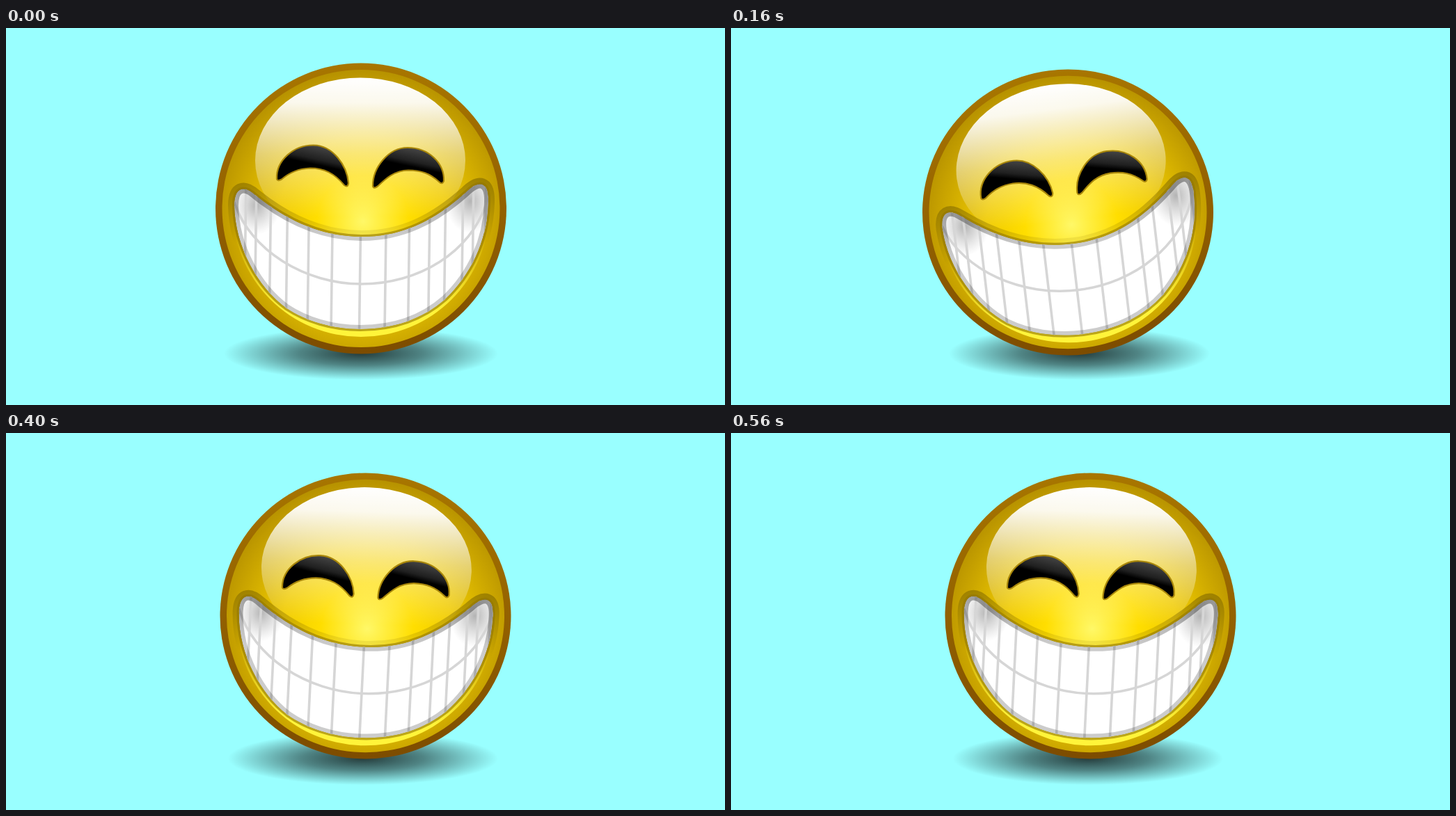
Write an HTML page that moves like this. It is 1033 px wide and 542 px high and loops after 0.64 s.

```html
<!DOCTYPE html>
<html lang="en">
<head>
<meta charset="utf-8">
<title>Rocking grin</title>
<style>
html, body { margin: 0; width: 100%; height: 100%; overflow: hidden; background: #9ff; }
svg { display: block; width: 100%; height: 100%; }
</style>
</head>
<body>
<svg viewBox="0 0 1033 542">
  <defs>
    <radialGradient id="shade">
      <stop offset="0" stop-color="#000" stop-opacity=".76"/>
      <stop offset=".45" stop-color="#000" stop-opacity=".48"/>
      <stop offset="1" stop-color="#000" stop-opacity="0"/>
    </radialGradient>
    <linearGradient id="rim" x2="0" y2="1">
      <stop offset="0" stop-color="#a87600"/>
      <stop offset="1" stop-color="#7d4c00"/>
    </linearGradient>
    <radialGradient id="skin" gradientUnits="userSpaceOnUse" cx="513" cy="278" r="222">
      <stop offset="0" stop-color="#fff868"/>
      <stop offset=".3" stop-color="#ffde00"/>
      <stop offset=".55" stop-color="#f0cb00"/>
      <stop offset="1" stop-color="#b48f00"/>
    </radialGradient>
    <linearGradient id="chin" gradientUnits="userSpaceOnUse" x1="0" y1="300" x2="0" y2="410">
      <stop offset="0" stop-color="#fff43a" stop-opacity="0"/>
      <stop offset="1" stop-color="#fff43a"/>
    </linearGradient>
    <linearGradient id="gloss" gradientUnits="userSpaceOnUse" x1="0" y1="71" x2="0" y2="272">
      <stop offset="0" stop-color="#fff"/>
      <stop offset=".18" stop-color="#fff" stop-opacity=".93"/>
      <stop offset=".55" stop-color="#fff" stop-opacity=".45"/>
      <stop offset="1" stop-color="#fff" stop-opacity="0"/>
    </linearGradient>
    <linearGradient id="eye" x1=".65" y1="0" x2=".42" y2=".6">
      <stop offset="0" stop-color="#484848"/>
      <stop offset=".55" stop-color="#202020"/>
      <stop offset=".75" stop-color="#000"/>
    </linearGradient>
    <linearGradient id="lip" gradientUnits="userSpaceOnUse" x1="0" y1="220" x2="0" y2="310">
      <stop offset="0" stop-color="#806800" stop-opacity=".6"/>
      <stop offset="1" stop-color="#806800" stop-opacity="0"/>
    </linearGradient>
    <linearGradient id="gum" gradientUnits="userSpaceOnUse" x1="0" y1="225" x2="0" y2="300">
      <stop offset="0" stop-opacity=".36"/>
      <stop offset="1" stop-opacity=".2"/>
    </linearGradient>
    <radialGradient id="corner">
      <stop offset="0" stop-color="#777" stop-opacity=".55"/>
      <stop offset="1" stop-color="#999" stop-opacity="0"/>
    </radialGradient>
    <path id="mouth" d="M328 255C328 230 341 225 358 240C405 278 455 300 512 300C570 300 616 276 660 237C680 217 694 221 693 250C692 305 668 355 631 390C598 419 556 433 509 433C468 433 430 421 403 403C362 373 329 315 328 255Z"/>
    <clipPath id="inside"><use href="#mouth"/></clipPath>
  </defs>

  <ellipse id="shadow" cy="468" ry="38" fill="url(#shade)"/>
  <g id="ball">
    <circle cx="510" cy="259.5" r="209" fill="url(#rim)"/>
    <circle cx="510" cy="259.5" r="199.500" fill="url(#skin)"/>
    <ellipse cx="509" cy="190.5" rx="151" ry="119" fill="url(#gloss)"/>
    <g id="face">
      <circle cx="510" cy="259.5" r="184.500" fill="url(#chin)"/>
      <g fill="url(#eye)" stroke="#a8860a" stroke-width="2.2" stroke-linejoin="round">
        <path d="M389 217C388 190 414 168 442 168.500C470 169 490 198 492 223Q491 230 486 226C472 209 457 201.500 437 201.500C420 202 407 208 396 217.500Q390 221 389 217Z"/>
        <path d="M527 227C527 201 549 172 577 172C607 172 630 194 629 220Q627 226 622 221C609 209 596 204.500 578 204.500C558 205 546 216 534 227.500Q528 232 527 227Z"/>
      </g>
      <use href="#mouth" fill="none" stroke="url(#lip)" stroke-width="18"/>
      <use href="#mouth" fill="none" stroke="#917600" stroke-opacity=".6" stroke-width="6"/>
      <g clip-path="url(#inside)">
        <use href="#mouth" fill="#fff"/>
        <ellipse cx="360" cy="255" rx="34" ry="42" fill="url(#corner)"/>
        <ellipse cx="667" cy="249" rx="36" ry="46" fill="url(#corner)"/>
        <g fill="none" stroke="#d6d6d6" stroke-width="3.6">
          <path id="teeth"/>
          <path d="M328 250C350 320 430 368 511 368C590 368 670 325 693 243"/>
        </g>
        <use href="#mouth" fill="none" stroke="url(#gum)" stroke-width="12"/>
      </g>
    </g>
  </g>
</svg>
<script>
const el = id => document.getElementById(id);
const STEP = 80;

// Sideways roll, tilt in degrees, top and bottom of the ball, drop of the face
const poses = [
  [0, 0, 51, 468, 0],
  [-13, -3.9, 55, 468, 5],
  [-26, -7.4, 60, 470, 6],
  [-13, -3.9, 55, 468, 5],
  [0, 0, 51, 468, 5],
  [6.5, 2, 58, 468, 5],
  [14.5, 4, 68.5, 469.5, 1],
  [6.5, 2, 58, 468, 5]
];

const gaps = [345, 360, 381, 405, 436, 470, 510.5, 547, 580.5, 609.5, 632, 657, 672, 690];
el("teeth").setAttribute("d", gaps.map(x => `M${x} 220L${x - 3} 436`).join(""));

function draw(time) {
  const [roll, tilt, top, bottom, drop] = poses[Math.floor(time / STEP) % poses.length];
  const left = 313 + Math.max(0, roll) * 0.9;
  const right = 707 + Math.min(0, roll) * 0.73;
  el("shadow").setAttribute("cx", (left + right) / 2);
  el("shadow").setAttribute("rx", (right - left) / 2);
  el("ball").setAttribute("transform",
    `translate(${510 + roll} ${(top + bottom) / 2}) scale(1 ${(bottom - top) / 417}) rotate(${tilt}) translate(-510 -259.5)`);
  el("face").setAttribute("transform", `translate(0 ${drop})`);
}

function tick() {
  draw(performance.now());
  requestAnimationFrame(tick);
}
tick();
</script>
</body>
</html>
```
